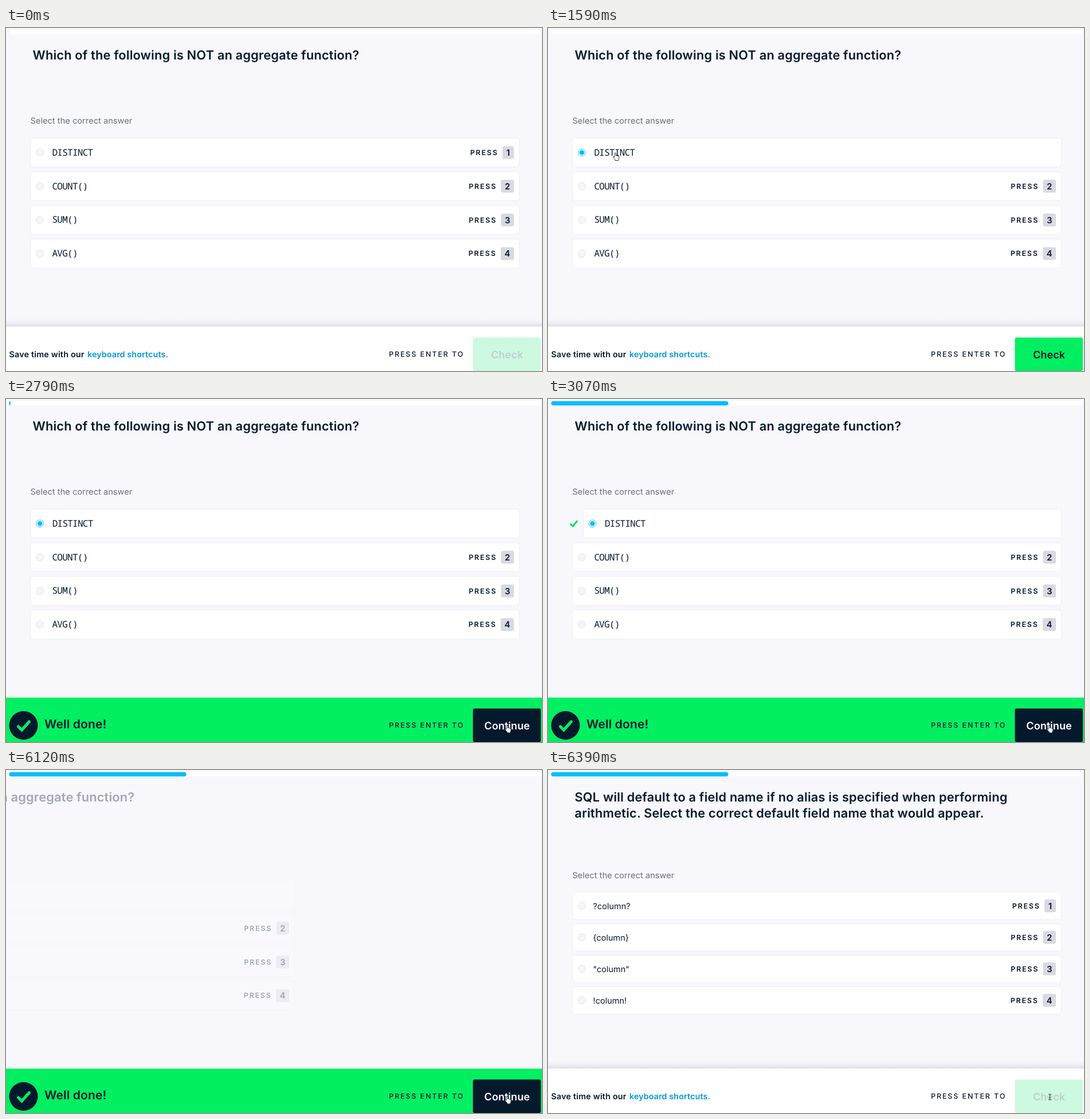
These frames come from a looping animation (935 by 599 pixels, 8 s). An HTML page:

```html
<!DOCTYPE html>
<html lang="en">
<head>
<meta charset="utf-8">
<title>Quiz</title>
<style>
  html, body { margin: 0; width: 100%; height: 100%; overflow: hidden; background: #f7f7fc; }
  svg { display: block; width: 100vw; height: 100vh; }
  text {
    font-family: Inter, Lato, sans-serif; font-optical-sizing: none;
    font-size: 14.5px; fill: #05192d; text-rendering: geometricPrecision;
  }
  .title { font-size: 21.75px; font-weight: 600; letter-spacing: .19px; }
  .hint { fill: #65707d; letter-spacing: .07px; }
  .code { font: 16px "Noto Sans Mono", monospace; letter-spacing: -.73px; }
  .press { font-size: 12.5px; font-weight: 600; letter-spacing: 1.8px; }
  .enter { font-size: 12.5px; font-weight: 500; letter-spacing: 1.9px; }
  .key { font-size: 15px; font-weight: 600; text-anchor: middle; }
  .save { font-size: 14.35px; font-weight: 600; letter-spacing: .18px; }
  .link { fill: #0097d9; letter-spacing: .09px; }
  .button { font-size: 18.1px; font-weight: 600; text-anchor: middle; }
  .done { font-size: 21px; font-weight: 600; letter-spacing: .15px; }
</style>
</head>
<body>
<svg id="stage" viewBox="0 0 935 599"></svg>
<script>
const LOOP = 8000;
const NAVY = '#05192d', GREEN = '#03ef62', MINT = '#cdf9e0', BLUE = '#05bdfc';
const TICKS = [0, 650, 720, 1520, 1590, 2730, 2790, 2860, 2930, 3000, 3070,
  5930, 5990, 6060, 6120, 6190, 6250, 6320, 6390];
const SENT = 2790, NEXT = 6190, SETTLED = 6390;

const stage = document.getElementById('stage');
const clamp = v => Math.max(0, Math.min(1, v));
const span = (t, from, to) => clamp((t - from) / (to - from));
const ease = p => p < .5 ? 4 * p ** 3 : 1 - (2 - 2 * p) ** 3 / 2;

const text = (x, y, cls, str, extra = '') =>
  `<text x="${x}" y="${y}" class="${cls}" ${extra}>${str}</text>`;
const rect = (x, y, w, h, fill, r = 0, extra = '') =>
  `<rect x="${x}" y="${y}" width="${w}" height="${h}" rx="${r}" fill="${fill}" ${extra}/>`;
const circle = (x, y, r, fill, extra = '') =>
  `<circle cx="${x}" cy="${y}" r="${r}" fill="${fill}" ${extra}/>`;
const path = (d, extra) => `<path d="${d}" ${extra}/>`;
const group = (x, y, body, opacity = 1) =>
  `<g transform="translate(${x} ${y})" opacity="${opacity}">${body}</g>`;

function radio(x, y, on) {
  const dot = on ? circle(x, y, 4.3, BLUE, `opacity="${on}"`) : '';
  return circle(x, y, 6.4, on ? '#fff' : '#f5f5fa', `stroke="${on ? '#35bdf2' : '#e3e4eb'}"`) + dot;
}

function pressKey(i, cy) {
  const x = [866, 863.5, 863.5, 863][i], w = 886 - x;
  return text(x - 56.3, cy + 4.5, 'press', 'PRESS') +
    rect(x, cy - 11.2, w, 22.5, '#d9d9e2', 3.5) +
    text(x + w / 2, cy + 5.5, 'key', i + 1);
}

function option(label, i, cy, h, cls, labelX, { on = 0, inset = 0 } = {}) {
  return rect(43 + inset, cy - h / 2, 852.5 - inset, h, '#fff', 4, 'stroke="#ededf3"') +
    radio(59 + inset, cy, on) +
    text(labelX + inset, cy + 5.3, cls, label) +
    (on ? '' : pressKey(i, cy));
}

function firstQuestion(t) {
  const on = t < 1520 ? 0 : t < 1590 ? .5 : 1;
  const right = ease(span(t, 2750, 3070));
  const tick = path('M39.5 218.5 43.3 222.3 50.5 213.5',
    `fill="none" stroke="#08de6b" stroke-width="3" stroke-linecap="round" opacity="${right}"`);
  const rows = ['DISTINCT', 'COUNT()', 'SUM()', 'AVG()'].map((label, i) =>
    option(label, i, 217.5 + 58.8 * i, 50.5, 'code', 80.5, i ? {} : { on, inset: 18.5 * right }));
  const out = t < 5930 ? 0 : ((t - 5905) / 215) ** 2;
  return group(-392 * out, 0,
    text(46.5, 55, 'title', 'Which of the following is NOT an aggregate function?') +
    text(42.5, 167, 'hint', 'Select the correct answer') +
    rows.join('') + tick, 1 - .65 * out);
}

function secondQuestion(t) {
  const lift = t < SETTLED ? -4.7 : 0;
  const rows = ['?column?', '{column}', '"column"', '!column!'].map((label, i) =>
    option(label, i, 237.2 + 55 * i, 47.5, '', 78.5));
  return group(855 * (1 - ease(span(t, 6162, 6385))), 0,
    text(46.5, 55, 'title', 'SQL will default to a field name if no alias is specified when performing') +
    text(46.5, 83, 'title', 'arithmetic. Select the correct default field name that would appear.') +
    group(0, lift, text(42.5, 189, 'hint', 'Select the correct answer') + rows.join('')));
}

function button(label, fill, ink) {
  return rect(814.5, 540.5, 118.5, 58.5, fill, 3) +
    text(874, 576.6, 'button', label, `style="fill:${ink}"`);
}

function footer(t) {
  const enter = text(668, 574.4, 'enter', 'PRESS ENTER TO');
  if (t >= SENT && t < NEXT) {
    return rect(0, 521.5, 935, 78, GREEN) +
      circle(30.5, 570, 25, NAVY) +
      path('M21.5 572 27.5 578 40.5 563.5',
        `fill="none" stroke="${GREEN}" stroke-width="5" stroke-linecap="round"`) +
      text(67, 574.5, 'done', 'Well done!') + enter + button('Continue', NAVY, '#fff');
  }
  const check = t < 1520 || t >= NEXT ? button('Check', MINT, '#bfcfcf')
    : t < 1590 ? button('Check', '#68f4a1', '#627c7e')
    : button('Check', GREEN, NAVY);
  return rect(0, 507, 935, 14.5, 'url(#shade)') + rect(0, 521.5, 935, 78, '#fff') +
    text(5.5, 574.8, 'save', 'Save time with our') +
    text(142, 574.8, 'save link', 'keyboard shortcuts.') + enter + check;
}

const arrow = path('M.5 .5V10.4L2.7 8.4 4.1 11.6 5.7 10.9 4.4 7.8H7.5Z',
  'fill="#111" stroke="#fff" stroke-width=".8"');
const hand = path('M3 8.5V2.2a1.2 1.2 0 0 1 2.4 0V6q1.2-.8 2 .3 1.3-.5 1.8.5 1.5-.3 1.6 1V10' +
  'q0 2-1 3V14.5H4.3V13Q2.5 11.5 .6 8.8 .5 7 2 7.6Z', 'fill="#fff" stroke="#222" stroke-width=".9"');
const beam = path('M-2.5-5Q0-5 0-4 0-5 2.5-5M0-4V4M-2.5 5Q0 5 0 4 0 5 2.5 5M-1.2 1.5H1.2',
  'fill="none" stroke="#333"');

function pointer(t) {
  if (t < 650) return '';
  if (t < 720) return group(737, 80, arrow);
  if (t < 1520) return group(726, 98, arrow);
  if (t < 2730) return group(113, 217, hand);
  if (t < NEXT) return group(870, 568.5, hand);
  return group(875.5, 571, beam);
}

const shade = `<defs><linearGradient id="shade" x2="0" y2="1">
  <stop offset="0" stop-color="${NAVY}" stop-opacity="0"/>
  <stop offset=".5" stop-color="${NAVY}" stop-opacity=".025"/>
  <stop offset="1" stop-color="${NAVY}" stop-opacity=".11"/>
</linearGradient></defs>`;

function draw(t) {
  const progress = 309 * ease(span(t, 2750, 3070));
  stage.innerHTML = shade + rect(0, 0, 935, 599, '#f7f7fc') +
    (t < NEXT ? firstQuestion(t) : secondQuestion(t)) +
    rect(5.5, 3.8, 927.5, 7.4, '#fff', 3.7) +
    (progress ? rect(5.5, 3.8, progress, 7.4, BLUE, 3.7) : '') +
    footer(t) + pointer(t);
}

let shown = -1;
const start = performance.now();
function frame() {
  const now = (performance.now() - start) % LOOP;
  const tick = TICKS.filter(v => v <= now).pop();
  if (tick !== shown) draw(shown = tick);
  requestAnimationFrame(frame);
}
frame();
</script>
</body>
</html>
```
